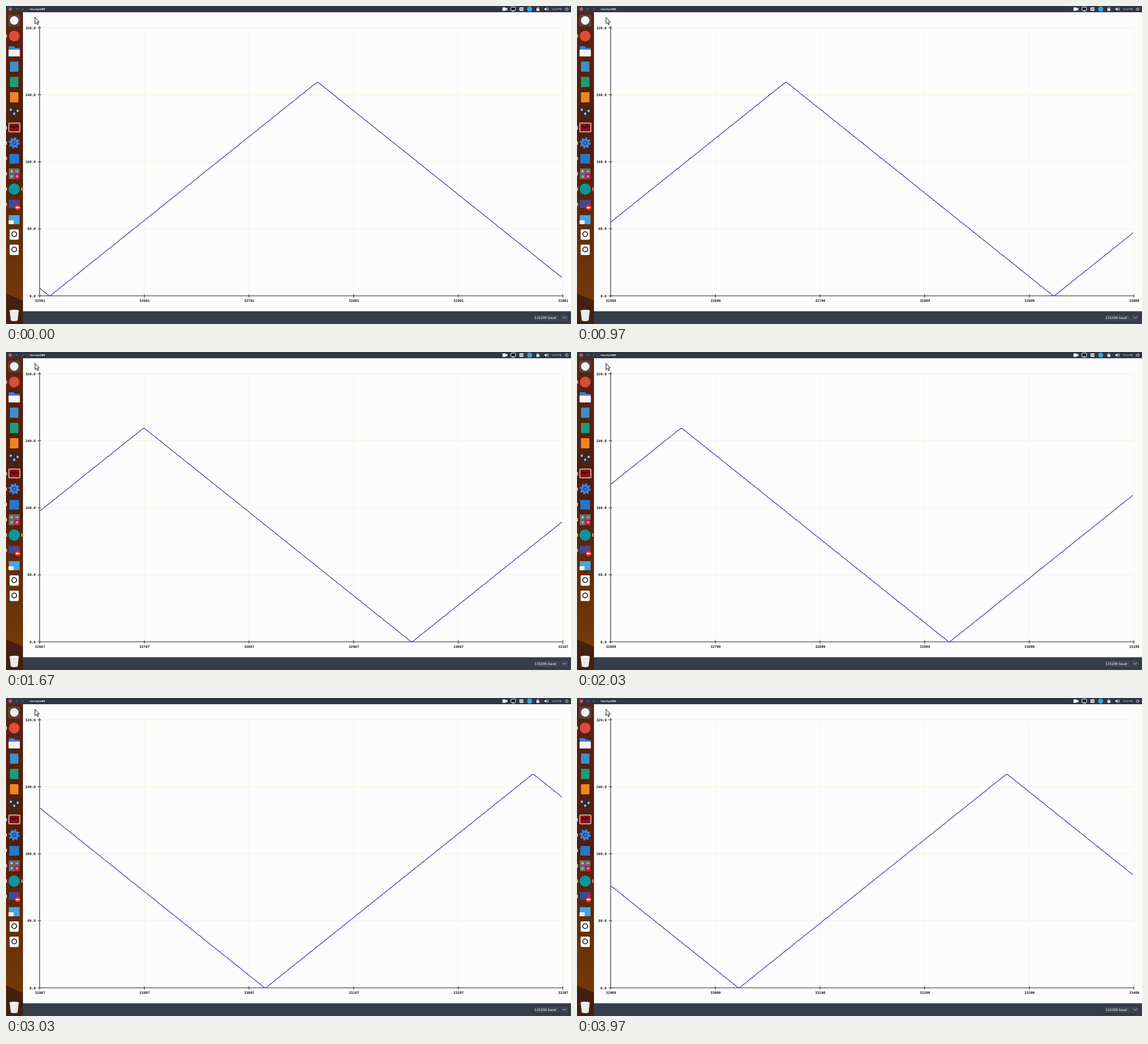
Write an HTML page that moves like this. It is 998 by 561 pixels and loops after 4010 ms.

```html
<!DOCTYPE html>
<html lang="en">
<head>
<meta charset="utf-8">
<title>Serial plotter</title>
<style>
  html, body { margin: 0; width: 100%; height: 100%; overflow: hidden; background: #fcfcfc; }
  svg { display: block; width: 998px; height: 561px; }
  text { font-family: "Open Sans", sans-serif; fill: #fff; }
  #labels text { font: bold 6px "DejaVu Sans Mono", monospace; fill: #111; }
</style>
</head>
<body>
<svg viewBox="0 0 998 561" fill="none">
  <defs>
    <linearGradient id="wall" x2="0" y2="1">
      <stop stop-color="#5a2413"/>
      <stop offset=".45" stop-color="#4f1d0b"/>
      <stop offset=".75" stop-color="#67300a"/>
      <stop offset="1" stop-color="#7b3e09"/>
    </linearGradient>
    <linearGradient id="screen">
      <stop stop-color="#2d4f9e"/>
      <stop offset="1" stop-color="#74376f"/>
    </linearGradient>
    <g id="disk">
      <rect x="6.5" y="-9" width="16" height="18" rx="1.5" fill="#fff"/>
      <circle cx="14.5" cy="-.5" r="4.2" stroke="#111" stroke-width="1.6"/>
      <path d="M8 9.5h13" stroke="#5e9a35"/>
    </g>
  </defs>

  <rect width="998" height="561" fill="#fcfcfc"/>
  <g id="grid"></g>
  <path id="axes" stroke="#222"/>
  <g id="labels"></g>
  <polyline id="wave" stroke="#1c18c8" stroke-width="1.05"/>

  <!-- launcher -->
  <rect y="11" width="30" height="550" fill="url(#wall)"/>
  <path d="M0 507L30 520V561H0Z" fill="#43200f"/>
  <path id="marks" stroke="#d8cfcb" stroke-width="1.5"/>
  <rect x="4" y="15" width="21" height="21" rx="3" fill="#56433d"/>
  <circle cx="14.5" cy="25.5" r="7.5" fill="#f4f2f1"/>
  <circle cx="14.5" cy="53" r="9.5" fill="#dd4b3c"/>
  <path d="M5 71h9l2 3h8v6H5Z" fill="#3f7fe0"/>
  <rect x="4.500" y="77" width="20" height="12" rx="1" fill="#f3f5f8"/>
  <rect x="7" y="98" width="15" height="18" rx="1" fill="#3f8fc6"/>
  <rect x="7" y="125" width="15" height="18" rx="1" fill="#1d9b78"/>
  <rect x="7" y="152" width="15" height="18" rx="1" fill="#ee8420"/>
  <g stroke="#24333d" stroke-width="2" fill="#8fd0ee">
    <path d="M8.500 178v19M14.500 178v19M20.500 178v19"/>
    <g stroke-width="1">
      <circle cx="8.500" cy="183" r="2.500"/><circle cx="14.500" cy="190" r="2.500"/><circle cx="20.500" cy="185" r="2.500"/>
    </g>
  </g>
  <rect x="5" y="206.500" width="19.500" height="15.500" rx="1" fill="#8e1218" stroke="#d8d4d0" stroke-width="1.500"/>
  <path d="M7 214l4-2 3 3 3-4 5 3" stroke="#3d0709" stroke-width="2"/>
  <g stroke="#3f82df">
    <circle cx="14.500" cy="241.500" r="8.500" stroke-width="3" stroke-dasharray="3.340"/>
    <circle cx="14.500" cy="241.500" r="5.700" fill="#28466f" stroke-width="4"/>
    <circle cx="14.500" cy="241.500" r="2" fill="#3f82df" stroke="none"/>
  </g>
  <rect x="6" y="261" width="17" height="17" fill="#2577c8"/>
  <g>
    <rect x="5" y="286.500" width="19" height="19" rx="1" fill="#6d7074"/>
    <path d="M15 296h9v9.500h-9Z" fill="#c01c48"/>
    <path d="M5 296h19M14.500 286.500v19" stroke="#45484c" stroke-width=".7"/>
    <path d="M8 291.500h4M10 289.500v4M17.500 291.500h4M8.500 299l3 3m0-3l-3 3M17.500 299.500h4m-4 2h4" stroke="#eee"/>
  </g>
  <circle cx="14.500" cy="323" r="10" fill="#0b969c"/>
  <rect x="5" y="342" width="19" height="14" fill="url(#screen)"/>
  <circle cx="20.500" cy="355.500" r="5" fill="#e32b36"/>
  <path d="M17.500 354h4v1l2-1v3l-2-1v1h-4Z" fill="#fff"/>
  <rect x="5" y="369" width="19" height="16" fill="#47a5e2"/>
  <rect x="4.500" y="378" width="9" height="7" rx="1" fill="#f3f1e6"/>
  <use href="#disk" y="403"/>
  <use href="#disk" y="430"/>
  <path d="M6.500 538h16l-2 17q-6 2-12 0Z" fill="#ececea"/>
  <ellipse cx="14.500" cy="538" rx="8.300" ry="2" fill="#fff" stroke="#c9c7c4" stroke-width=".7"/>

  <!-- top panel -->
  <rect width="998" height="11" fill="#303644"/>
  <circle cx="7.500" cy="5.500" r="3" fill="#cc575d"/>
  <path d="M17 5.500h3.500M28 7l3-3" stroke="#8d929d" stroke-width=".9"/>
  <text x="41.500" y="7" font-size="4.200" font-weight="700">/dev/ttyUSB0</text>
  <g fill="#fff">
    <path d="M877 2.500h5.500v2l3-1.500v5l-3-1.500v2H877Z"/>
    <rect x="892" y="2" width="8" height="6" rx="1" fill="#10131a" stroke="#fff"/>
    <path d="M894 9.300h4" stroke="#fff" stroke-width=".8"/>
    <rect x="907" y="2.500" width="7" height="6" rx=".8"/>
    <text x="908" y="7" font-size="4" font-weight="700" style="fill:#303644">EN</text>
    <circle cx="925" cy="5.500" r="4.500" fill="#3a9fe0"/>
    <rect x="937" y="4.500" width="5" height="4"/>
    <path d="M938 5V3.200q1.500-1.800 3 0V5" stroke="#fff" stroke-width=".8" fill="none"/>
    <path d="M951 4.500h1.500l2-2v6l-2-2H951Z"/>
    <path d="M955.500 3.500q1.500 2 0 4M957 2.500q2 3 0 6" stroke="#fff" stroke-width=".7" fill="none"/>
    <text x="964" y="7" font-size="4">12:52 PM</text>
    <path d="M989.500 3.600a2.300 2.300 0 1 0 2.200 0M990.600 2.500v3" stroke="#fff" stroke-width=".8" fill="none"/>
  </g>

  <!-- status bar -->
  <rect x="30" y="538.500" width="968" height="22.500" fill="#383d4b"/>
  <rect x="931" y="543.500" width="62.500" height="13" rx="1" fill="#404552" stroke="#2a2e39"/>
  <path d="M978.500 543.500v13" stroke="#2a2e39"/>
  <path d="M983.500 548l3 3.200 3-3.200" stroke="#c8cbd2"/>
  <text x="933.500" y="552.300" style="font:5.750px 'DejaVu Sans',sans-serif">115200 baud</text>

  <path d="M51.200 19.800v11.400l2.500-2.300 1.800 4 1.800-.8-1.800-3.900h3.200Z" fill="#fff" stroke="#111" stroke-width="1"/>
</svg>
<script>
const LEFT = 59.5, BOTTOM = 511.3, STEP_X = 924.2 / 500, STEP_Y = 472.8 / 320;
const LOOP = 4010, PIXEL = 0.5198;
// [step, first sample index on the axis]
const KEYS = [[0, 32501], [17, 32557], [39, 32634], [61, 32699], [78, 32761], [102, 32846], [119, 32900]];

const $ = id => document.getElementById(id);
const xAt = n => LEFT + n * STEP_X;
const yAt = v => BOTTOM - v * STEP_Y;
const snap = p => Math.round(p / PIXEL) * PIXEL;

function add(parent, tag, attrs, text = '') {
  const el = document.createElementNS('http://www.w3.org/2000/svg', tag);
  for (const name in attrs) el.setAttribute(name, attrs[name]);
  el.textContent = text;
  return $(parent).appendChild(el);
}

let axes = `M${LEFT} 35V${BOTTOM}H984`;
const counters = [];
for (let i = 0; i < 5; i++) {
  const y = yAt(i * 80);
  axes += `M56 ${y}h6`;
  add('labels', 'text', { x: 52.3, y: y + 2.2, 'text-anchor': 'end' }, (i * 80).toFixed(1));
  if (i) add('grid', 'path', { d: `M60 ${y}H984`, stroke: i > 1 ? '#f4f4d6' : '#ececfa' });
}
for (let i = 0; i < 6; i++) {
  const x = xAt(i * 100);
  axes += `M${x} 508.500v6`;
  counters.push(add('labels', 'text', { x: x + 0.5, y: 521.6, 'text-anchor': 'middle' }));
  if (i) add('grid', 'path', { d: `M${x} 38V511`, stroke: i % 2 ? '#f4f4e2' : '#f1f1fb' });
}
$('axes').setAttribute('d', axes);
$('marks').setAttribute('d',
  [53, 215, 242, 269, 296, 323, 350].map(y => `M.8 ${y - 3}v6`).join('') + 'M28 320v6');

// Triangle from 0 to 255 and back, each end held for two samples
function sample(index) {
  const phase = (index - 32511 + 512) % 512;
  return phase < 256 ? phase : 511 - phase;
}

function firstIndex(step) {
  const i = KEYS.findIndex(key => key[0] >= step);
  if (i < 1) return KEYS[0][1];
  const [a, from] = KEYS[i - 1], [b, to] = KEYS[i];
  return Math.round(from + (to - from) * (step - a) / (b - a));
}

let shown;
function draw(now) {
  const t = now % LOOP, part = t % 100;
  // 30 steps a second, timed to 10 ms
  const step = Math.min(119, 3 * Math.floor(t / 100) + (part >= 30) + (part >= 70));
  if (step !== shown) {
    shown = step;
    const first = firstIndex(step);
    counters.forEach((el, i) => el.textContent = first + i * 100);
    const points = Array.from({ length: 500 }, (_, n) =>
      `${snap(xAt(n)).toFixed(2)},${snap(yAt(sample(first + n))).toFixed(2)}`);
    $('wave').setAttribute('points', points.join(' '));
  }
  requestAnimationFrame(draw);
}
draw(0);
</script>
</body>
</html>
```
